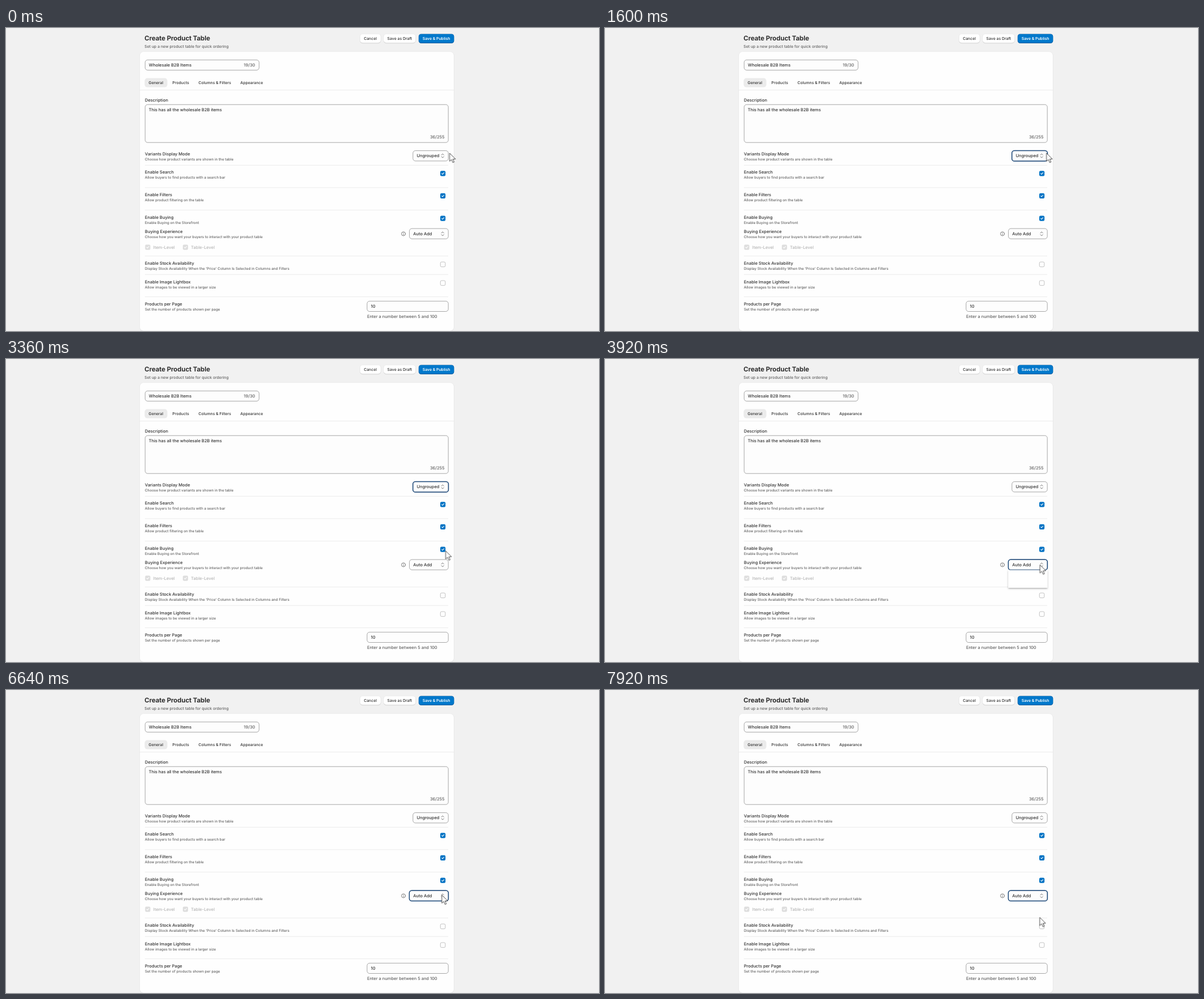
An HTML page that plays this animation: 1046x535 px, repeating every 8000 ms.

```html
<!DOCTYPE html>
<html lang="en">
<head>
<meta charset="utf-8">
<title>Create Product Table</title>
<style>
  html, body { margin: 0; width: 100%; height: 100%; overflow: hidden; background: #f1f1f1; }
  svg { display: block; width: 100vw; height: 100vh; }
  text { font: 450 7.46px Inter, sans-serif; fill: #303030; text-rendering: geometricPrecision; white-space: pre; }
  .title { font-size: 11.47px; font-weight: 650; letter-spacing: -.1px; }
  .lead { font-size: 6.88px; fill: #616161; }
  .sub { font-size: 6.31px; fill: #616161; }
  .tab, .btn { font-size: 6.88px; font-weight: 550; }
  .btn { text-anchor: middle; }
  .main { font-weight: 600; fill: #fff; }
  .muted { fill: #616161; }
  .off { fill: #b5b5b5; }
  .end { text-anchor: end; }
  .field { fill: #fdfdfd; stroke: #8a8a8a; stroke-width: .75; }
  .rule { stroke: #e8e8e8; stroke-width: .8; fill: none; }
  .line { fill: none; stroke-linecap: round; stroke-linejoin: round; }
  .ring { fill: none; stroke: #1d4a7c; stroke-width: 1.5; }

  /* 1% of the loop is 80 ms */
  .ring, .menu, .items { animation: 8s step-end infinite; }
  .ring.variants { animation-name: variants; }
  .ring.buying { animation-name: buying; }
  .menu { animation-name: menu; }
  .items { animation-name: items; }
  .cursor { animation: move 8s linear infinite; }

  @keyframes variants { 0% { opacity: 0 } 7.8% { opacity: 1 } 48.8%, 100% { opacity: 0 } }
  @keyframes buying { 0% { opacity: 0 } 48.8%, 100% { opacity: 1 } }
  @keyframes menu { 0% { opacity: 0 } 48.8% { opacity: 1 } 73.8%, 100% { opacity: 0 } }
  @keyframes items { 0% { opacity: 0 } 50.8%, 100% { opacity: 1 } }
  @keyframes move {
    0%, 1% { transform: translate(782.5px, 221px); animation-timing-function: ease-in-out }
    8%, 15% { transform: translate(774px, 222.5px); animation-timing-function: ease-in-out }
    19.8%, 22% { transform: translate(778.7px, 221px); animation-timing-function: ease-in-out }
    32.8%, 34% { transform: translate(774.7px, 295.5px); animation-timing-function: ease-in-out }
    40%, 41% { transform: translate(777px, 335px) }
    44%, 45% { transform: translate(772.5px, 346px) }
    48.8%, 54.7% { transform: translate(767.2px, 363.5px) }
    54.8%, 82.7% { transform: translate(767.2px, 362px) }
    82.8%, 87% { transform: translate(768.7px, 362px) }
    90%, 91% { transform: translate(768.7px, 364px) }
    94%, 95% { transform: translate(768.2px, 370px) }
    98.8%, 100% { transform: translate(766.8px, 401.5px) }
  }
</style>
</head>
<body>
<svg viewBox="0 0 1046 535" preserveAspectRatio="none">
  <defs>
    <filter id="soft" x="-20%" y="-30%" width="140%" height="180%">
      <feDropShadow dx="0" dy="1.5" stdDeviation="1.8" flood-opacity=".32"/>
    </filter>
    <path id="tick" class="line" stroke="#fff" stroke-width="1.05" d="M-2 .1 -.6 1.5 2.1 -1.4"/>
    <g id="on"><rect x="-4.6" y="-4.6" width="9.2" height="9.2" rx="2.2" fill="#0073c4"/><use href="#tick"/></g>
    <g id="locked"><rect x="-4.6" y="-4.6" width="9.2" height="9.2" rx="2.2" fill="#dedede"/><use href="#tick"/></g>
    <rect id="empty" x="-4.3" y="-4.3" width="8.6" height="8.6" rx="2.1" fill="#fdfdfd" stroke="#a9a9a9" stroke-width=".7"/>
    <path id="arrows" class="line" stroke="#5c5c5c" stroke-width=".85" d="M-2.1 -1.4 0 -3.5 2.1 -1.4M-2.1 1.4 0 3.5 2.1 1.4"/>
  </defs>

  <rect width="1046" height="535" fill="#f1f1f1"/>
  <text class="title" x="244.3" y="22.3">Create Product Table</text>
  <text class="lead" x="244.3" y="34.5">Set up a new product table for quick ordering</text>

  <g>
    <rect x="624.3" y="11.2" width="36.9" height="16" rx="4.6" fill="#cfcfcf"/>
    <rect x="624.3" y="10.6" width="36.9" height="15.6" rx="4.6" fill="#fff" stroke="#e0e0e0" stroke-width=".5"/>
    <rect x="666" y="11.2" width="56.6" height="16" rx="4.6" fill="#cfcfcf"/>
    <rect x="666" y="10.6" width="56.6" height="15.6" rx="4.6" fill="#fff" stroke="#e0e0e0" stroke-width=".5"/>
    <rect x="727.8" y="10.4" width="62.6" height="16.6" rx="4.6" fill="#005a9e"/>
    <rect x="728.2" y="11" width="61.8" height="15" rx="4.2" fill="#0078cb"/>
    <text class="btn" x="642.6" y="20.6">Cancel</text>
    <text class="btn" x="694.4" y="20.6">Save as Draft</text>
    <text class="btn main" x="759.1" y="20.6">Save &amp; Publish</text>
  </g>

  <rect x="235.6" y="42.2" width="554.8" height="493.4" rx="7" fill="#dcdcdc"/>
  <rect x="235.7" y="41.6" width="554.6" height="493.4" rx="7" fill="#fefefe" stroke="#e4e4e4" stroke-width=".6"/>

  <rect class="field" x="245.4" y="56.4" width="201" height="18" rx="4.4"/>
  <text x="252" y="67.7">Wholesale B2B Items</text>
  <text class="muted end" x="439.4" y="67.7">19/30</text>

  <rect x="244.6" y="88.6" width="40" height="16" rx="4.6" fill="#ebebeb"/>
  <text class="tab" x="251.5" y="98.5">General</text>
  <text class="tab" x="293.5" y="98.5">Products</text>
  <text class="tab" x="339.4" y="98.5">Columns &amp; Filters</text>
  <text class="tab" x="413.3" y="98.5">Appearance</text>
  <path class="rule" d="M236 109.6H790"/>

  <text x="245" y="129.8">Description</text>
  <rect class="field" x="245.4" y="135.2" width="534.8" height="67" rx="4.4"/>
  <text x="251.8" y="146.8">This has all the wholesale B2B items</text>
  <text class="muted end" x="773.6" y="194.6">36/255</text>

  <path class="rule" d="M245 242.3H780M245 281.8H780M245 321.5H780M245 402.6H780M245 435.2H780M245 474.6H780"/>

  <text x="245" y="224.8">Variants Display Mode</text>
  <text class="sub" x="245" y="233.8">Choose how product variants are shown in the table</text>
  <text x="245" y="257.3">Enable Search</text>
  <text class="sub" x="245" y="266.4">Allow buyers to find products with a search bar</text>
  <text x="245" y="296.9">Enable Filters</text>
  <text class="sub" x="245" y="305.9">Allow product filtering on the table</text>
  <text x="245" y="337.2">Enable Buying</text>
  <text class="sub" x="245" y="346.2">Enable Buying on the Storefront</text>
  <text x="245" y="362.1">Buying Experience</text>
  <text class="sub" x="245" y="371.1">Choose how you want your buyers to interact with your product table</text>
  <text x="245" y="418.2">Enable Stock Availability</text>
  <text class="sub" x="245" y="427.2">Display Stock Availability When the 'Price' Column Is Selected in Columns and Filters</text>
  <text x="245" y="450.9">Enable Image Lightbox</text>
  <text class="sub" x="245" y="459.9">Allow images to be viewed in a larger size</text>
  <text x="245" y="490.3">Products per Page</text>
  <text class="sub" x="245" y="499.4">Set the number of products shown per page</text>

  <use href="#on" x="770.6" y="256.8"/>
  <use href="#on" x="770.6" y="296.4"/>
  <use href="#on" x="770.6" y="336.2"/>
  <use href="#locked" x="250" y="387.1"/>
  <use href="#locked" x="316.5" y="387.1"/>
  <text class="off" x="259.8" y="389.7">Item-Level</text>
  <text class="off" x="326.3" y="389.7">Table-Level</text>
  <use href="#empty" x="770.6" y="417.4"/>
  <use href="#empty" x="770.6" y="450.3"/>

  <rect class="field" x="717.8" y="216.6" width="62.4" height="18.2" rx="4.4"/>
  <rect class="ring variants" x="717.7" y="216.4" width="62.8" height="18.7" rx="4.4"/>
  <text x="724.5" y="228.3">Ungrouped</text>
  <use href="#arrows" x="770.2" y="225.6"/>

  <g class="line" stroke="#5c5c5c" stroke-width=".8">
    <circle cx="701.1" cy="363.4" r="3.5"/>
    <path d="M701.1 363.2V365.2M701.1 361.5V361.6"/>
  </g>
  <rect class="field" x="711.6" y="354.1" width="68.6" height="18.2" rx="4.4"/>
  <rect class="ring buying" x="711.4" y="353.9" width="69" height="18.7" rx="4.4"/>
  <text x="718.2" y="366.1">Auto Add</text>
  <use href="#arrows" x="770.2" y="363.4"/>

  <rect class="field" x="636.9" y="482.3" width="143.3" height="18.2" rx="4.4"/>
  <text x="643.6" y="494.2">10</text>
  <text class="muted" x="636.9" y="511.7">Enter a number between 5 and 100</text>

  <g class="menu">
    <rect x="711.4" y="372.6" width="69" height="31.4" fill="#fff" filter="url(#soft)"/>
    <g class="items">
      <rect x="711.7" y="372.9" width="68.4" height="30.8" fill="#fff" stroke="#6b6b6b" stroke-width=".8"/>
      <rect x="712.1" y="373.3" width="67.6" height="15" fill="#0f5bcd"/>
      <text x="718.9" y="383.6" style="fill:#fff;font-weight:500">Auto Add</text>
      <text x="718.9" y="399.2">Cart Button</text>
    </g>
  </g>

  <path class="cursor" fill="#fff" stroke="#2b2b2b" stroke-width=".85" stroke-linejoin="round"
    d="M0 0V14.4L3.3 11.4 5.7 16.6 8 15.6 5.7 10.6 10.3 10.3Z"/>
</svg>
</body>
</html>
```
